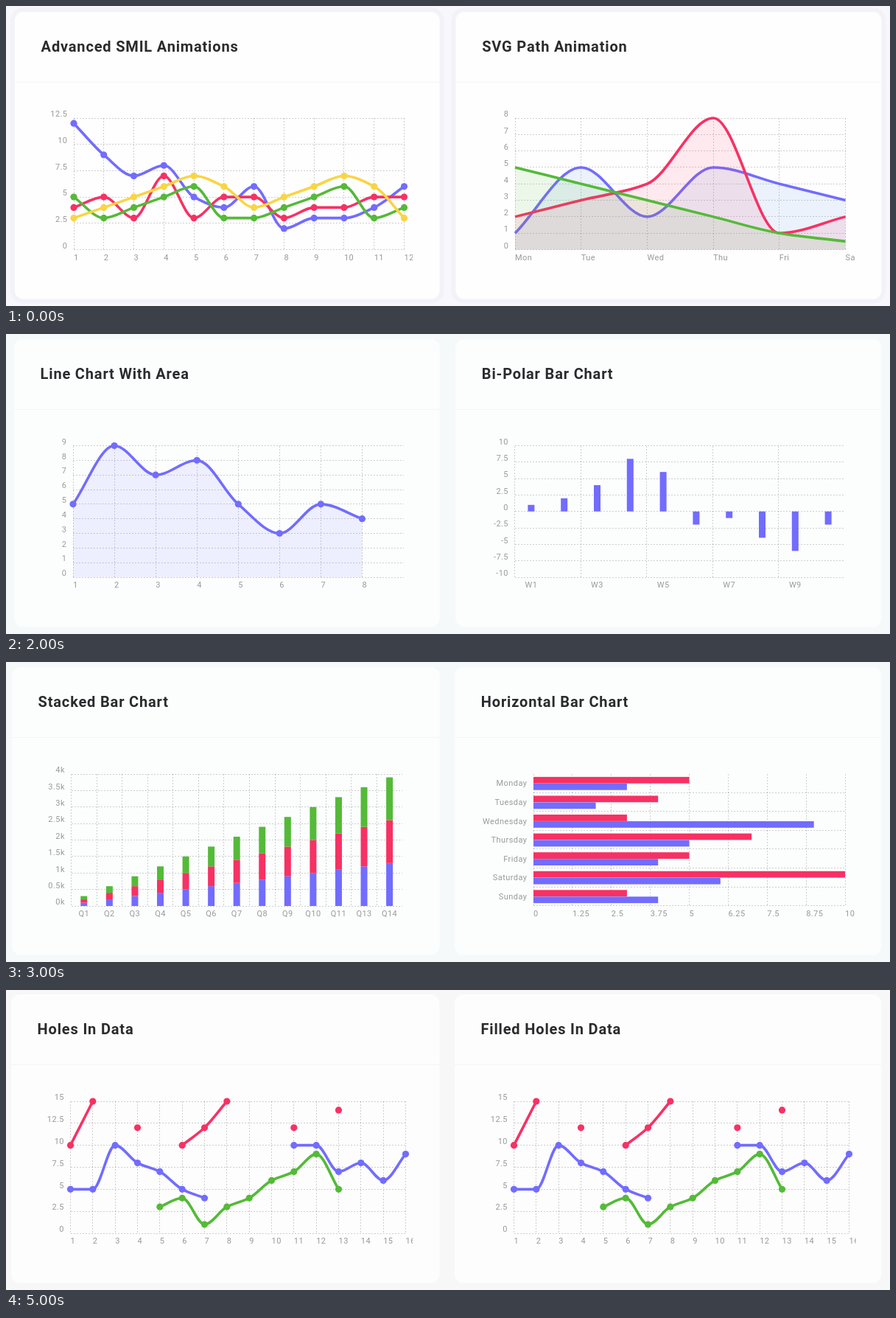
An HTML page for the animation above (6000 ms loop, 1200 by 407 pixels).

```html
<!DOCTYPE html>
<html lang="en">
<head>
<meta charset="utf-8">
<title>Chart cards</title>
<style>
  html, body { margin: 0; width: 100%; height: 100%; overflow: hidden; background: #f7f7f8; }
  svg { display: block; }
  text { font: 11px Roboto, sans-serif; letter-spacing: .45px; fill: #999; }
  .title { font-size: 20px; font-weight: 600; letter-spacing: .83px; fill: #2b2b2e; }
  .grid { stroke: #000; stroke-opacity: .19; stroke-dasharray: 2; shape-rendering: crispEdges; fill: none; }
  .line { fill: none; stroke-width: 3.6; }
</style>
</head>
<body>
<svg id="stage" width="100%" height="100%" viewBox="0 0 1200 407"></svg>
<script>
const BLUE = '#726cff', RED = '#f73164', GREEN = '#54ba38', YELLOW = '#f9d545', CRIMSON = '#dc3545';
const COLORS = [BLUE, RED, GREEN, YELLOW];
const TINTS = ['#448ae2', RED, GREEN, YELLOW];

const make = (n, fn) => Array.from({ length: n }, (_, i) => fn(i));
const count = n => make(n, i => i + 1);
const gap = n => Array(n).fill(null);
const words = s => s.split(' ');
const each = (list, fn) => list.map(fn).join('');

const label = (x, y, s, anchor = 'start') => `<text x="${x}" y="${y}" text-anchor="${anchor}">${s}</text>`;
const rect = (x, y, w, h, fill, extra = '') =>
  `<rect x="${x}" y="${y}" width="${w}" height="${h}" fill="${fill}" ${extra}/>`;
const grid = d => `<path class="grid" d="${d}"/>`;
const snap = v => Math.floor(v) + .5;

// Plot area: pixel box, value range and distance between columns
const plot = (x0, x1, y0, y1, lo, hi, columns) => ({
  x0, x1, y0, y1, lo, hi,
  pitch: (x1 - x0) / columns,
  x(i) { return x0 + i * this.pitch; },
  y: v => y1 - (v - lo) / (hi - lo) * (y1 - y0)
});

const hLine = (p, y) => grid(`M${p.x0} ${snap(y)}H${p.x1}`);
const vLine = (p, x) => grid(`M${snap(x)} ${p.y0}V${p.y1}`);

function yAxis(p, step, format = v => v) {
  const ticks = make(Math.round((p.hi - p.lo) / step) + 1, i => p.lo + i * step);
  return each(ticks, v => hLine(p, p.y(v)) + label(p.x0 - 8.5, p.y(v) - 1.7, format(v), 'end'));
}

const xAxis = (p, names) =>
  each(names, (s, i) => vLine(p, p.x(i)) + label(p.x(i), p.y1 + 14.3, s));

// Labels in the middle of a bar's column; every: columns per label
const bandAxis = (p, names, every = 1) => each(names, (s, i) =>
  vLine(p, p.x(i * every)) + label(p.x(i * every + .5), p.y1 + 14.3, s, 'middle'));

// Monotone cubic through evenly spaced points
function curve(pts) {
  const n = pts.length;
  if (n < 2) return '';
  const dx = pts[1][0] - pts[0][0];
  const d = make(n - 1, i => (pts[i + 1][1] - pts[i][1]) / dx);
  const m = make(n, i => {
    const a = d[i - 1] ?? d[i], b = d[i] ?? a;
    return a * b > 0 ? 2 * a * b / (a + b) : 0;
  });
  return 'M' + pts[0] + each(d, (_, i) => {
    const [x, y] = pts[i], [u, v] = pts[i + 1];
    return `C${x + dx / 3} ${y + m[i] * dx / 3} ${u - dx / 3} ${v - m[i + 1] * dx / 3} ${u} ${v}`;
  });
}

// Splits a series at its empty values
function runs(p, values) {
  const out = [[]];
  values.forEach((v, i) => v === null ? out.push([]) : out.at(-1).push([p.x(i), p.y(v)]));
  return out.filter(r => r.length);
}

function lines(p, series, { dots = true, stroke = true, area } = {}) {
  const base = p.y(Math.max(p.lo, 0));
  return each(series, (values, k) => each(runs(p, values), pts => {
    const d = curve(pts);
    return (area ? `<path d="${d}V${base}H${pts[0][0]}Z" fill="${area[k]}" fill-opacity=".1"/>` : '') +
      (stroke ? `<path class="line" d="${d}" stroke="${COLORS[k]}"/>` : '') +
      (dots ? each(pts, ([x, y]) => `<circle cx="${x}" cy="${y}" r="4.6" fill="${COLORS[k]}"/>`) : '');
  }));
}

// Vertical bar between two values
function bar(p, x, a, b, fill) {
  const top = p.y(Math.max(a, b));
  return rect(x - 4.5, top, 9, p.y(Math.min(a, b)) - top, fill);
}

const fall = [12, 9, 7, 8, 5];

function multiLine() {
  const p = plot(92, 540.5, 152, 330.5, 0, 12.5, 11);
  const saw = [3, 4, 5, 6, 3], hill = [4, 5, 6, 7, 6];
  return yAxis(p, 2.5) + xAxis(p, count(12)) + lines(p, [
    [...fall, 4, 6, 2, 3, 3, 4, 6],
    [4, 5, 3, 7, 3, 5, 5, 3, 4, 4, 5, 5],
    [5, ...saw, ...saw, 4],
    [3, ...hill, ...hill, 3]
  ]);
}

function pathAreas() {
  const p = plot(691, 1139.5, 152, 330.5, 0, 8, 5);
  const slope = make(6, i => Math.max(5 - i, .5));
  return yAxis(p, 1) + xAxis(p, words('Mon Tue Wed Thu Fri Sa')) +
    lines(p, [[1, 5, 2, 5, 4, 3], [2, 3, 4, 8, 1, 2], slope], { dots: false, area: TINTS });
}

function donut() {
  let start = -15;
  return each([[25, BLUE], [20, RED], [50, GREEN], [25, YELLOW], [50, CRIMSON]], ([size, color]) => {
    const turn = start / 170 * 360 - 90;
    start += size;
    return `<circle cx="300.3" cy="250.5" r="80" fill="none" stroke="${color}" stroke-width="53.5" pathLength="170"
      stroke-dasharray="${size} 170" transform="rotate(${turn} 300.3 250.5)"/>`;
  });
}

function bipolarArea() {
  const p = plot(690.5, 1138.5, 152.5, 330.5, -3, 3, 7);
  return yAxis(p, 1) + lines(p, [
    [1, 2, 3, 1, -2, 0, 1, 0],
    make(8, i => i % 2 ? -1 : i === 4 ? -2.5 : -2),
    make(8, i => Math.max(0, Math.min(2.5, 3 - Math.abs(i - 5)))),
    [2.5, 2, 1, .5, 1, .5, -1, -2.5]
  ], { dots: false, stroke: false, area: TINTS });
}

function lineArea() {
  const p = plot(91, 539.5, 151.5, 330, 0, 9, 8);
  return yAxis(p, 1) + xAxis(p, count(8)) + lines(p, [[5, 9, 7, 8, 5, 3, 5, 4]], { area: [BLUE] });
}

function bipolarBars() {
  const p = plot(690.5, 1138.5, 151.5, 330, -10, 10, 10);
  return yAxis(p, 2.5) + bandAxis(p, words('W1 W3 W5 W7 W9'), 2) +
    each([1, 2, 4, 8, 6, -2, -1, -4, -6, -2], (v, i) => bar(p, p.x(i + .5), 0, v, BLUE));
}

function stackedBars() {
  const p = plot(88.5, 537.9, 152, 331, 0, 4, 13);
  const names = [...count(11), 13, 14].map(n => 'Q' + n);
  return yAxis(p, .5, v => v + 'k') + bandAxis(p, names) +
    each(count(13), n => each(count(3), k =>
      bar(p, p.x(n - .5), (k - 1) * n / 10, k * n / 10, COLORS[k - 1])));
}

function horizontalBars() {
  const p = plot(716, 1139, 152, 331, 0, 10, 8), row = 179 / 7, unit = 42.3;
  const days = words('Monday Tuesday Wednesday Thursday Friday Saturday Sunday');
  const red = [5, 4, 3, 7, 5, 10, 3], blue = [3, 2, 9, 5, 4, 6, 4];
  return xAxis(p, make(9, i => i * 1.25)) + each(days, (day, i) => {
    const mid = p.y0 + row * (i + .5);
    return hLine(p, mid + row / 2 - .4) + label(707.5, mid + 3.7, day, 'end') +
      rect(p.x0, mid - 8.9, red[i] * unit, 8.8, RED) + rect(p.x0, mid + .1, blue[i] * unit, 8.8, BLUE);
  });
}

function groupedBars() {
  const p = plot(70, 538, 152, 331, 0, 7, 8);
  const shared = [4.9, 3, 3.8, 3.8, 1.9];
  const series = [
    [.9, .4, 1.5, ...shared],
    [6.4, 5.7, 7, ...shared],
    make(8, i => 2.6 + (i + 3) % 4 * .8),
    [3.8, 4.1, 2.8, 1.8, 2.2, 1.9, 6.7, 2.9]
  ];
  return yAxis(p, 1) + bandAxis(p, make(8, i => `${2014 + i}-${15 + i}`)) +
    each(series, (values, k) => each(values, (v, i) =>
      bar(p, p.x(i + .5) + (k - 1.5) * 13.5, 0, v, COLORS[k])));
}

function simpleLine() {
  const p = plot(689.5, 1117.5, 152, 331, 0, 12.5, 4);
  return yAxis(p, 2.5) + xAxis(p, words('Monday Tuesday Wednesday Thursday Friday')) +
    lines(p, [fall, [2, 1, 3.5, 7, 3], make(5, i => i ? i + 2 : 1)]);
}

function holes(x) {
  const p = plot(x, x + 455, 151, 330, 0, 15, 15);
  return yAxis(p, 2.5) + xAxis(p, count(16)) + lines(p, [
    [5, 5, 10, 8, 7, 5, 4, ...gap(3), 10, 10, 7, 8, 6, 9],
    [10, 15, null, 12, null, 10, 12, 15, ...gap(2), 12, null, 14],
    [...gap(4), 3, 4, 1, 3, 4, 6, 7, 9, 5]
  ]);
}

// clip: right edge of the chart
function card(x, right, y, look, title, chart, clip) {
  const w = right - x, h = 397.5 - y;
  const ring = look.ring ? rect(x - 3, y - 3, w + 6, h + 6, 'none', `rx="14" stroke="${look.ring}" stroke-width="6"`) : '';
  return ring + rect(x, y, w, h, look.card, 'rx="12"') + rect(x, y + 95, w, 1, '#f4f4f6') +
    `<svg width="${clip}" height="407"><text class="title" x="${x + 35.6}" y="${y + 53.7}">${title}</text>${chart}</svg>`;
}

// x, y: corner of the left card; the right one drifts a third as far
const slide = (look, x, y, titleA, chartA, titleB, chartB) =>
  `<g visibility="hidden">${rect(0, 0, 1200, 407, look.bg)}` +
  card(x, 588.5, y, look, titleA, chartA, 552.3) +
  card(606.6 + x / 3, 1188.3, y, look, titleB, chartB, 1153.7) + '</g>';

const lilac = { bg: '#f8f7fb', card: '#fefefe', ring: '#f3f2f8' };
const gray = { bg: '#f7f7f7', card: '#fdfdfd' };
const mint = { bg: '#f6f9fa', card: '#fcfefe' };
const stage = document.getElementById('stage');

stage.innerHTML =
  slide(lilac, 12, 8, 'Advanced SMIL Animations', multiLine(), 'SVG Path Animation', pathAreas()) +
  slide(gray, 12, 8, 'Animating A Donut With Svg.Animate', donut(), 'Bi-Polar Line Chart With Area Only', bipolarArea()) +
  slide(mint, 11, 7, 'Line Chart With Area', lineArea(), 'Bi-Polar Bar Chart', bipolarBars()) +
  slide(mint, 8, 7, 'Stacked Bar Chart', stackedBars(), 'Horizontal Bar Chart', horizontalBars()) +
  slide(lilac, 7, 6, 'Extreme Responsive Configuration', groupedBars(), 'Simple Line Chart', simpleLine()) +
  slide(gray, 7, 6, 'Holes In Data', holes(87.5), 'Filled Holes In Data', holes(689.5));

const slides = [...stage.children];
const begin = performance.now();

function frame() {
  const now = Math.floor((performance.now() - begin) / 1000) % slides.length;
  slides.forEach((s, i) => s.setAttribute('visibility', i === now ? 'visible' : 'hidden'));
  requestAnimationFrame(frame);
}
frame();
</script>
</body>
</html>
```
